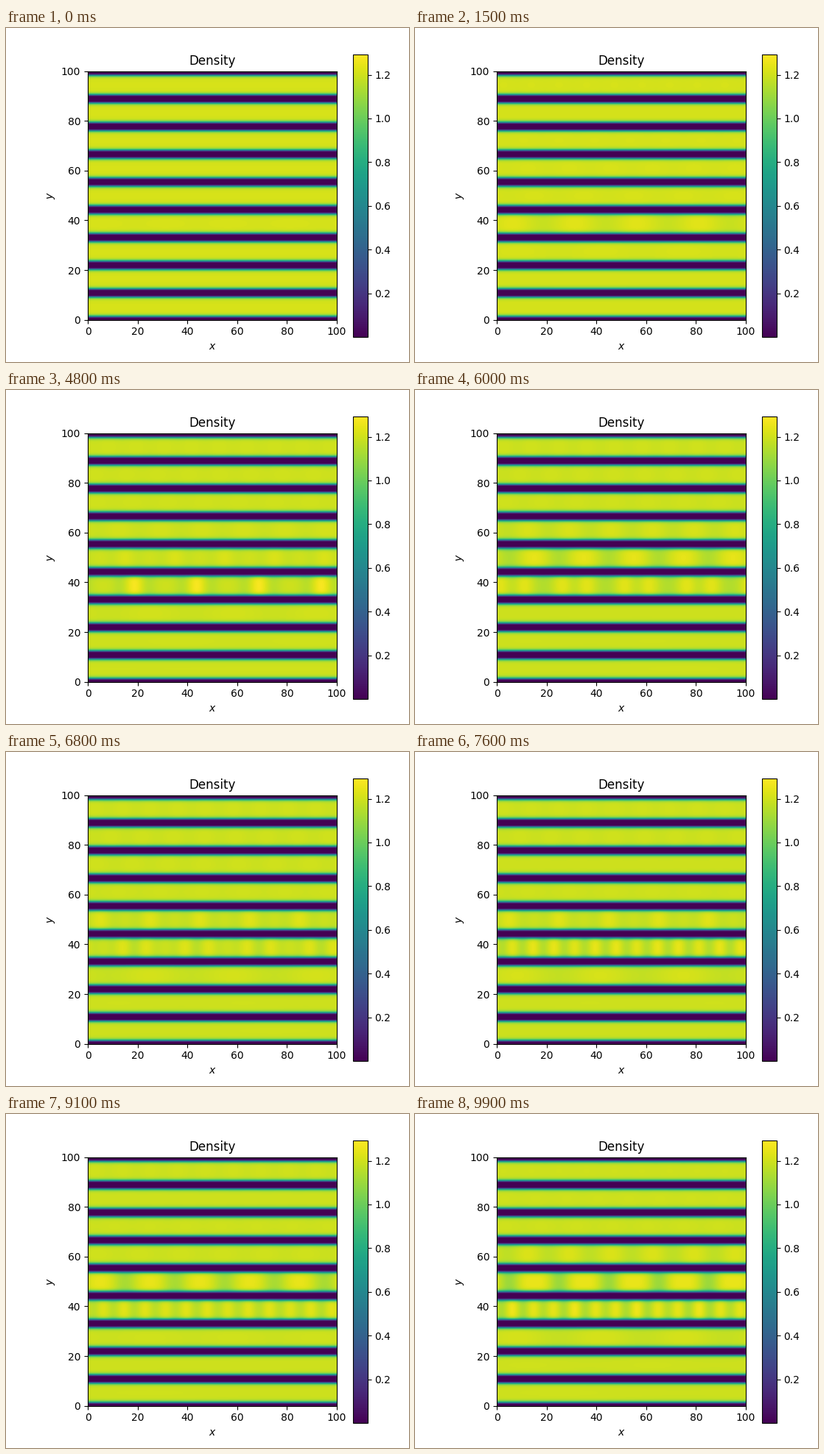
A matplotlib script for the animation above (10 s loop, 547 by 454 pixels).

```python
import numpy as np
import matplotlib.pyplot as plt
from matplotlib.animation import FuncAnimation

W, H, DPI = 547, 454, 100
FRAMES, INTERVAL = 100, 100
SIZE, CHANNELS, CELLS = 100, 9, 338
VMAX = 1.2946

plt.rcParams["font.family"] = "DejaVu Sans"
fig = plt.figure(figsize=(W / DPI, H / DPI), dpi=DPI, facecolor="white")


def add_axes(left, top, right, bottom):
    return fig.add_axes([left / W, 1 - bottom / H,
                         (right - left) / W, (bottom - top) / H])


x = (np.arange(CELLS) + 0.5) * SIZE / CELLS
pitch = SIZE / CHANNELS
offset = x + 0.2
wall_dist = np.abs(offset - pitch * np.round(offset / pitch))
profile = np.tanh(np.clip(wall_dist - 0.9, 0, None) / 0.85) ** 2
channel = np.clip((offset // pitch).astype(int), 0, CHANNELS - 1)


def swing(t, period, peak):
    return np.cos(2 * np.pi * (t - peak) / period)


def ramp(t, start, end):
    s = np.clip((t - start) / (end - start), 0, 1)
    return s * s * (3 - 2 * s)


def harmonics(n, t):
    """Amplitudes of the first three harmonics in channel n."""
    grow = np.tanh(t / 4)
    if n == 3:
        return 0.02 * grow * swing(t, 2.1, 9.7), 0, 0
    if n == 4:
        return (0.095 * np.exp(-((t - 4.2) / 2.4) ** 2) * swing(t, 1.4, 2.97),
                0.04 * ramp(t, 2.5, 5) * swing(t, 0.75, 4.8),
                0.052 * ramp(t, 3.6, 7.5) * swing(t, 0.38, 9.1 + 0.05))
    if n == 5:
        return (-0.075 * grow * swing(t, 1.35, 9.9),
                -0.018 * ramp(t, 3, 6) * swing(t, 0.675, 9.9), 0)
    if n == 6:
        return -0.018 * grow * (swing(t, 1.35, 9.9) + 0.5), 0, 0
    weak = 0.003 if n < 3 else 0.007
    return weak * grow * swing(t, 1.35 * 5 / n, 3.0), 0, 0


def density(t):
    rows = []
    for n in range(1, CHANNELS + 1):
        theta = 2 * np.pi * n * x / SIZE - np.pi / 2
        wave = sum(a * np.cos(m * theta)
                   for m, a in enumerate(harmonics(n, t), 1))
        rows.append(1.215 - 0.018 * ramp(t, 0, 6) + wave)
    return profile[:, None] * np.array(rows)[channel]


ax = add_axes(111, 58.5, 449, 396.7)
image = ax.imshow(density(0), origin="lower", extent=(0, SIZE, 0, SIZE),
                  aspect="auto", cmap="viridis", vmin=0, vmax=VMAX)
ax.set_title("Density")
ax.set_xlabel("$x$")
ax.set_ylabel("$y$")
ticks = range(0, SIZE + 1, 20)
ax.set_xticks(ticks)
ax.set_yticks(ticks)

cax = add_axes(470.5, 35.5, 490.5, 420)
fig.colorbar(image, cax=cax, ticks=np.arange(1, 7) * 0.2)


def update(i):
    image.set_data(density(i * INTERVAL / 1000))
    return [image]


anim = FuncAnimation(fig, update, frames=FRAMES, interval=INTERVAL,
                     repeat=True, repeat_delay=0)
plt.show()
```
